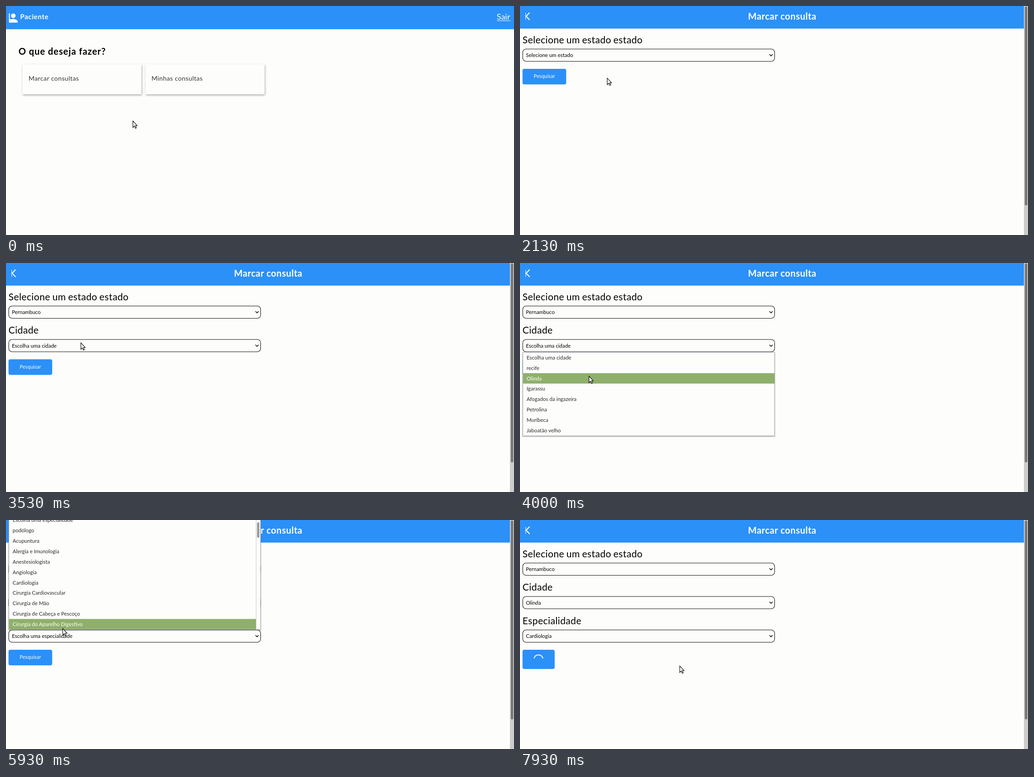
An HTML page for the animation above (8000 ms loop, 1114 px wide and 503 px high).

```html
<!DOCTYPE html>
<html lang="pt-BR">
<head>
<meta charset="utf-8">
<title>Marcar consulta</title>
<style>
  html, body { margin: 0; width: 100%; height: 100%; overflow: hidden; background: #fdfdfb; }
  svg { display: block; width: 100vw; height: 100vh; font-family: Lato, "Open Sans", sans-serif; }
  .bar, .button { fill: #2b90f7; }
  .brand { font: 700 15px Lato, sans-serif; letter-spacing: .6px; fill: #fff; }
  .exit { font-size: 18px; fill: #fff; }
  .question { font: 700 20px Lato, sans-serif; letter-spacing: .9px; }
  .card { fill: #fdfdfb; filter: drop-shadow(1px 2px 2px #0005); }
  .cardText { font-size: 14px; letter-spacing: .4px; fill: #333; }
  .title { font: 700 20px Lato, sans-serif; letter-spacing: .5px; fill: #fff; }
  .label { font-size: 21px; letter-spacing: .36px; word-spacing: -1px; }
  .field { fill: #fdfdfb; stroke: #111; stroke-width: 1.1; }
  .value, .item { font-size: 11.45px; }
  .item { fill: #2a2a2a; }
  .list { fill: #fdfdfb; stroke: #a9a9b4; filter: drop-shadow(0 1px 1px #0006); }
  .hover { fill: #8fb06c; }
  .hovered { fill: #fff; }
  .buttonText { font-size: 11px; letter-spacing: .1px; fill: #fff; }
  .line { fill: none; stroke-linecap: round; stroke-linejoin: round; }
</style>
</head>
<body>
<svg id="stage" viewBox="0 0 1114 503" preserveAspectRatio="none"></svg>
<script>
const LOOP = 8000, FPS = 15, ROW = 22.85, STEP = 73.5;
const stage = document.getElementById('stage');

const pickState = 'Selecione um estado';
const pickCity = 'Escolha uma cidade';
const pickField = 'Escolha uma especialidade';
const states = [pickState, 'Pernambuco'];
const cities = [pickCity, 'recife', 'Olinda', 'Igarassu', 'Afogados da ingazeira',
  'Petrolina', 'Muribeca', 'Jaboatão velho'];
const fields = [pickField, 'podólogo', 'Acupuntura', 'Alergia e Imunologia', 'Anestesiologista',
  'Angiologia', 'Cardiologia', 'Cirurgia Cardiovascular', 'Cirurgia de Mão',
  'Cirurgia de Cabeça e Pescoço', 'Cirurgia do Aparelho Digestivo'];

// Moments of the visit, in ms
const at = {
  page: 1060, openState: 3060, setState: 3330, openCity: 3660, setCity: 4260,
  openEmpty: 4860, closeEmpty: 5400, openField: 5660, setField: 6800, search: 7390
};

// Pointer stops: time, x, y
const stops = [
  [130, 278, 252], [800, 204, 177], [1130, 204, 177], [2600, 187, 152], [2870, 187, 152],
  [3060, 180, 113], [3330, 172, 156], [3660, 160, 184], [4000, 151, 248], [4300, 151, 249],
  [4860, 127, 263], [5660, 127, 263], [6600, 113, 140], [6830, 113, 140],
  [7340, 64, 303], [7460, 64, 303], [7800, 350, 320]
];

function pointerAt(t) {
  const next = stops.findIndex(s => s[0] > t);
  if (next === 0) return stops[0].slice(1);
  if (next < 0) return stops.at(-1).slice(1);
  const [t0, x0, y0] = stops[next - 1], [t1, x1, y1] = stops[next];
  const u = (t - t0) / (t1 - t0), k = u * u * (3 - 2 * u);
  return [x0 + (x1 - x0) * k, y0 + (y1 - y0) * k];
}

const text = (kind, x, y, s) => `<text class="${kind}" x="${x}" y="${y}">${s}</text>`;
const rect = (kind, x, y, w, h, r = 0) =>
  `<rect class="${kind}" x="${x}" y="${y}" width="${w}" height="${h}" rx="${r}"/>`;
const line = (d, color, width) =>
  `<path class="line" d="${d}" stroke="${color}" stroke-width="${width}"/>`;

function home() {
  return rect('bar', 0, 0, 1114, 51)
    + '<path fill="#fff" d="M6.5 16h2v13.5Q11 28.5 15.5 28.5C21 28.5 25.5 31 25.5 34V36.5H6.5Z"/>'
    + '<circle cx="16" cy="21.5" r="5" fill="#fff"/>'
    + text('brand', 31, 29, 'Paciente')
    + text('exit', 1076, 30, 'Sair')
    + line('M1077 32.5H1106', '#fff', 1)
    + text('question', 27.5, 107, 'O que deseja fazer?')
    + rect('card', 36, 128, 261, 66, 1) + text('cardText', 49.5, 164, 'Marcar consultas')
    + rect('card', 306, 128, 261, 66, 1) + text('cardText', 319, 164, 'Minhas consultas');
}

function select(i, label, value) {
  const y = 94.5 + i * STEP;
  return text('label', 5.5, y - 13, label)
    + rect('field', 6, y, 552.4, 27, 7.5)
    + text('value', 13, y + 17.5, value)
    + line(`M547.5 ${y + 12}l3 3.2 3-3.2`, '#111', 1.6);
}

function dropdown(items, top, pointerY, width = 552) {
  const row = Math.floor((pointerY - top) / ROW);
  const active = row >= 0 && row < items.length ? row : 0;
  const rows = items.map((s, i) => {
    const y = top + i * ROW;
    return (i === active ? rect('hover', 6.5, y, width, ROW) : '')
      + text(i === active ? 'item hovered' : 'item', 14.5, y + 15.5, s);
  });
  return rect('list', 6.2, top - .2, 552, items.length * ROW + .8) + rows.join('');
}

function button(y, t) {
  if (t < at.search) return rect('button', 5.5, y, 95.8, 34.2, 4) + text('buttonText', 30, y + 20, 'Pesquisar');
  const turn = (t - 7930) * .36;
  return rect('button', 5.5, y, 70.5, 42.2, 4)
    + `<g transform="translate(40.5 ${y + 21.5}) rotate(${turn})">`
    + line('M-9.5 -3.2A10 10 0 0 1 9.5 -3.2', '#e8f2fd', 2.2) + '</g>';
}

function booking(t, pointerY) {
  const during = (a, b) => t >= at[a] && t < at[b];
  const count = t < at.setState ? 1 : t < at.setCity ? 2 : 3;
  const selects = [
    ['Selecione um estado estado', t < at.setState ? pickState : 'Pernambuco'],
    ['Cidade', t < at.setCity ? pickCity : 'Olinda'],
    ['Especialidade', t < at.setField ? pickField : 'Cardiologia']
  ];
  let out = rect('bar', 0, 0, 1105, 49.6)
    + line('M12.5 15.5V30', '#fff', 1) + line('M20.5 15L13.5 22.5 20.5 30', '#fff', 2)
    + text('title', 500, 30, 'Marcar consulta')
    + '<path fill="#cdcdcd" d="M1105 0h9v503h-9z"/>'
    + '<rect x="1107" y="1" width="5.5" height="437" rx="2.7" fill="#777"/>'
    + selects.slice(0, count).map((s, i) => select(i, ...s)).join('')
    + button(138 + (count - 1) * STEP, t);
  if (during('openState', 'setState')) out += dropdown(states, 122.8, pointerY);
  if (during('openCity', 'setCity')) out += dropdown(cities, 196.3, pointerY);
  if (during('openEmpty', 'closeEmpty')) out += dropdown([pickField], 269.8, pointerY);
  if (during('openField', 'setField')) {
    out += dropdown(fields, -11.1, pointerY, 542)
      + line('M548.5 0V240', '#c9c9d0', 1)
      + '<rect x="550.5" y="5" width="5" height="34" rx="2.5" fill="#999"/>';
  }
  return out;
}

function pointer(x, y) {
  return `<path transform="translate(${x} ${y})" fill="#fff" stroke="#111" stroke-width="1.2"
    d="M.3 .5V14.8L3.5 11.8 5.8 16.6 8 15.6 5.8 10.9H9.8Z"/>`;
}

let shown = -1;
function draw(now) {
  const tick = Math.floor((now % LOOP + 4) * FPS / 1000) % (LOOP * FPS / 1000);
  if (tick !== shown) {
    shown = tick;
    const t = tick * 1000 / FPS, [x, y] = pointerAt(t);
    stage.innerHTML = (t < at.page ? home() : booking(t, y)) + pointer(x, y);
  }
  requestAnimationFrame(draw);
}
draw(0);
</script>
</body>
</html>
```
